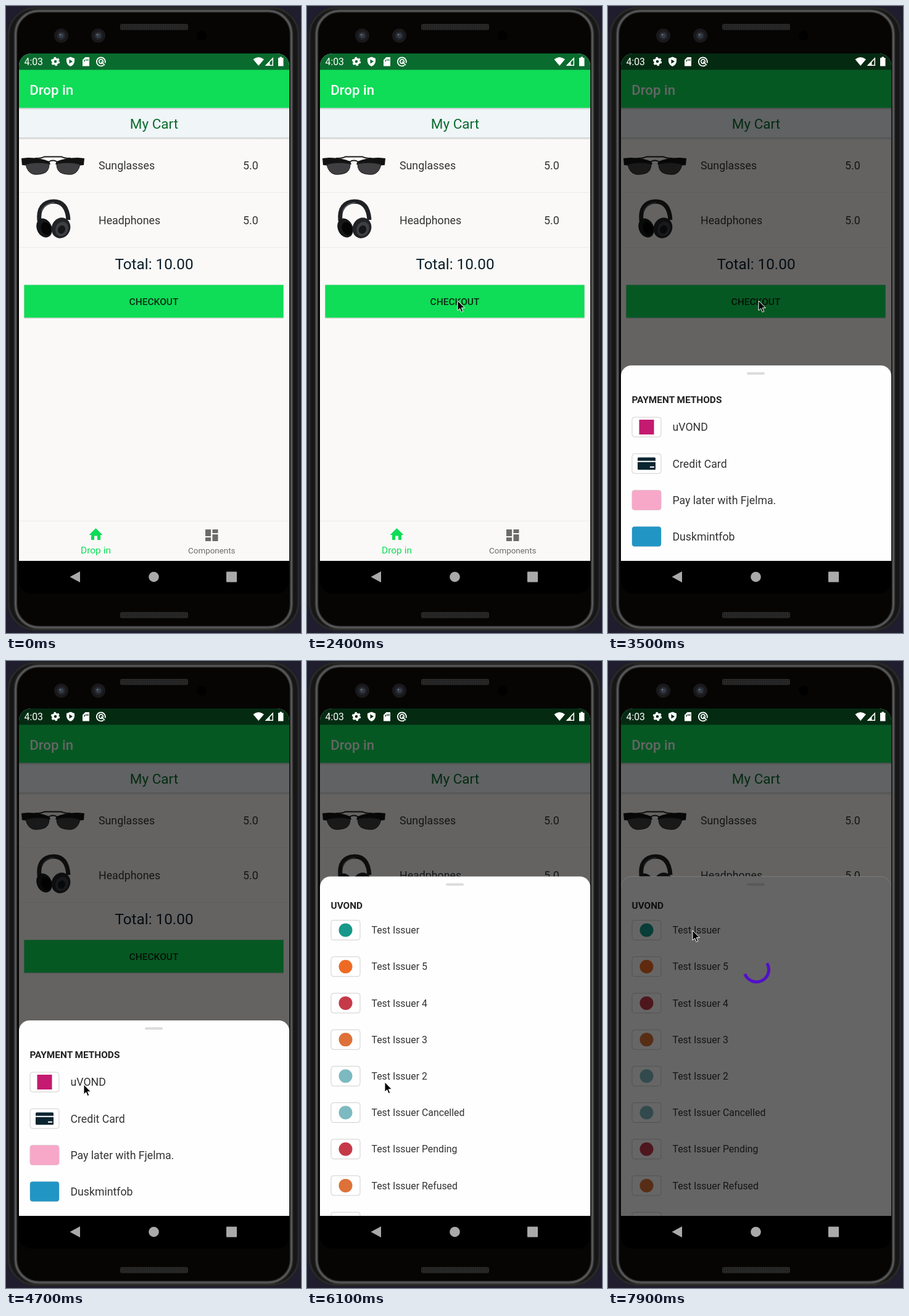
Write an HTML page that moves like this. It is 478 px wide and 1017 px high and loops after 8 s.

```html
<!DOCTYPE html>
<html lang="en">
<head>
<meta charset="utf-8">
<title>Drop in checkout</title>
<style>
  html, body { margin: 0; width: 100%; height: 100%; overflow: hidden; background: #1f1d2e; }
  svg { display: block; width: 100%; height: 100%; }
  text { font-family: Roboto, "Noto Sans", sans-serif; fill: #333; }
  .mid { text-anchor: middle; }
  .med { font-weight: 500; }
  .item { font-size: 17.8px; }
  .head { font-size: 15.4px; font-weight: 700; fill: #222; }
</style>
</head>
<body>
<svg viewBox="0 0 478 1017">
  <defs>
    <clipPath id="screen"><rect x="21" y="77" width="438" height="876" rx="20"/></clipPath>
    <clipPath id="window"><rect x="21" y="77" width="438" height="823"/></clipPath>
    <filter id="soft"><feGaussianBlur stdDeviation="0.8"/></filter>
    <linearGradient id="shade" x2="0" y2="1">
      <stop stop-opacity=".2"/><stop offset="1" stop-opacity="0"/>
    </linearGradient>
    <pattern id="mesh" width="3" height="3" patternUnits="userSpaceOnUse">
      <rect width="3" height="3" fill="#2c2c2c"/><circle cx="1.5" cy="1.5" r=".9" fill="#141414"/>
    </pattern>
    <g id="lens">
      <circle r="11.5" fill="#19191c"/><circle r="7" fill="#24262b"/>
      <circle r="4" fill="#343c48"/><circle cx="-1.5" cy="-1.5" r="1.3" fill="#66717f"/>
    </g>
    <g id="glass">
      <path d="M25 247L36 246Q56 246 70 252L72 257 36 259 26 258Z" fill="#121212"/>
      <path d="M32 257Q50 252 70 256 70 266 64 270 56 274 45 273 35 271 32 257Z" fill="#3f3e40" stroke="#1c1c1c"/>
      <path d="M69 253Q72 250.500 76 250.500M47 247Q58 247 62 244.500H76" fill="none" stroke="#1c1c1c" stroke-width="2"/>
    </g>
  </defs>

  <!-- Phone body -->
  <rect x="2" y="1" width="474" height="1013" rx="46" fill="#161616"/>
  <rect x="18" y="10" width="442" height="996" rx="36" fill="#060504"/>
  <g fill="none" filter="url(#soft)">
    <rect x="4" y="3" width="470" height="1009" rx="44" stroke="#383838" stroke-width="2"/>
    <rect x="15.5" y="8" width="447" height="1000" rx="37" stroke="#6a6a6a" stroke-width="3"/>
  </g>
  <use href="#lens" x="89.5" y="48"/>
  <use href="#lens" x="149.5" y="48"/>
  <circle cx="317" cy="48" r="8" fill="#000"/>
  <rect x="185" y="29" width="110" height="10" rx="3" fill="url(#mesh)"/>
  <rect x="185" y="983" width="110" height="10" rx="3" fill="url(#mesh)"/>

  <g clip-path="url(#screen)">
    <rect x="21" y="77" width="438" height="823" fill="#faf9f7"/>
    <rect x="21" y="77" width="438" height="27" fill="#0a6b2e"/>
    <rect x="21" y="103.5" width="438" height="62" fill="#0fdc57"/>
    <text class="med" x="38.3" y="143.5" font-size="22.3" style="fill:#fff">Drop in</text>
    <rect x="21" y="165.5" width="438" height="48.5" fill="#f0f5f8"/>
    <rect x="21" y="165.5" width="438" height="3" fill="url(#shade)"/>
    <rect x="21" y="213.5" width="438" height="3.5" fill="url(#shade)"/>
    <text class="mid" x="240" y="199" font-size="22.5" style="fill:#0a6b2e">My Cart</text>

    <!-- Sunglasses -->
    <use href="#glass"/>
    <use href="#glass" transform="translate(152) scale(-1 1)"/>
    <!-- Headphones -->
    <path d="M54 349Q51 318 77 317 99 317 101 347" fill="none" stroke="#202124" stroke-width="7"/>
    <path d="M58 333Q62 321 78 319" fill="none" stroke="#55575a" stroke-width="2"/>
    <ellipse cx="62" cy="360" rx="12" ry="16" transform="rotate(-24 62 360)" fill="#17181a"/>
    <ellipse cx="65" cy="361" rx="8" ry="11" transform="rotate(-24 65 361)" fill="#050505"/>
    <g transform="rotate(24 89 360)">
      <ellipse cx="89" cy="360" rx="15" ry="17" fill="#222326"/>
      <ellipse cx="91" cy="361" rx="10" ry="12" fill="#3d3f43"/>
      <ellipse cx="91" cy="362" rx="6" ry="7" fill="#151618"/>
    </g>

    <text class="item" x="150" y="265">Sunglasses</text>
    <text class="item" x="384" y="265">5.0</text>
    <text class="item" x="150" y="354">Headphones</text>
    <text class="item" x="384" y="354">5.0</text>
    <path d="M21 302.5H459M21 391.5H459M21 835.5H459" stroke="#ecebea"/>
    <text class="mid" x="240" y="427" font-size="24.3" style="fill:#0b1f2a">Total: 10.00</text>
    <rect x="29" y="452" width="421" height="55" rx="1" fill="#000" opacity=".13"/>
    <rect x="29.5" y="452.5" width="420" height="53" fill="#0fdc57"/>
    <text class="mid med" x="239.5" y="485" font-size="15.5" style="fill:#0b2a15">CHECKOUT</text>

    <path d="M134.500 858L145.500 847 156.500 858H153V866H148V859.500H143V866H138V858Z" fill="#0fdc57"/>
    <text class="mid" x="145.5" y="888" font-size="15.5" style="fill:#0fdc57">Drop in</text>
    <path d="M323 849h9v11h-9zM323 862h9v6h-9zM334.500 849h9v6h-9zM334.500 857h9v11h-9z" fill="#6b6b6b"/>
    <text class="mid" x="333.3" y="888" font-size="13.4" style="fill:#6b6b6b">Components</text>

    <rect x="21" y="900" width="438" height="53"/>
    <rect id="dim" x="21" y="77" width="438" height="823"/>
    <g id="methods"></g>
    <g id="issuers"></g>

    <!-- System icons -->
    <g fill="#fff">
      <text x="29.5" y="96" font-size="15.8" style="fill:#fff">4:03</text>
      <circle cx="80" cy="90" r="4" fill="none" stroke="#fff" stroke-width="3.5"/>
      <circle cx="80" cy="90" r="6.2" fill="none" stroke="#fff" stroke-width="2" stroke-dasharray="3.25"/>
      <path fill-rule="evenodd" d="M104.500 82.500L111 85V90Q110.500 95 104.500 98 98.500 95 98 90V85ZM102.500 86.500V93.500L108 90Z"/>
      <path fill-rule="evenodd" d="M128.500 83H135V97.500H124V87.500ZM126.500 87.500V90H128V87.500ZM129.300 86V89H130.600V86ZM132 86V89H133.300V86Z"/>
      <g fill="none" stroke="#fff" stroke-width="1.7">
        <path d="M158 96A7 7 0 1 1 160.500 92.500"/><circle cx="154" cy="90" r="3.3"/><path d="M154 90L160 96"/>
      </g>
      <path d="M400.500 86.500Q409 79.500 418 86.500L409.200 97Z"/>
      <path fill-rule="evenodd" d="M433 83V97H419.500ZM431.500 87L427.500 91V95.500H431.500Z"/>
      <path d="M441 84H443.500V82.500H447V84H449.500V97.500H441Z"/>
    </g>
    <g fill="#aaa">
      <path d="M103.500 926L120 917V935Z"/><circle cx="239.5" cy="926" r="8.3"/>
      <rect x="357" y="917.5" width="17" height="17" rx="1"/>
    </g>
  </g>
  <path id="cursor" d="M0 0V16L3.700 12.600 6.200 18.500 8.800 17.400 6.300 11.700H11.400Z" stroke="#fff"/>
</svg>
<script>
const $ = id => document.getElementById(id);
const ROW = 59.2;

const dot = color => y => `<circle cx="62.5" cy="${y}" r="11" fill="${color}"/>`;
const square = color => y => `<rect x="50.5" y="${y - 12}" width="24" height="24" fill="${color}"/>`;
const tile = color => y => `<rect x="39" y="${y - 16}" width="47" height="32" rx="4" fill="${color}"/>`;
const card = y => `<rect x="48" y="${y - 10}" width="29" height="20" rx="1.5" fill="#0b2530"/>
  <path d="M48 ${y - 3.5}H77M68 ${y + 5.5}H75" stroke="#fff" stroke-width="2"/>`;

// A bottom sheet: grip, heading and rows of [label, icon]
function sheet(top, headY, title, firstY, size, rows) {
  const body = rows.map(([label, icon], i) => {
    const y = firstY + i * ROW;
    return `<rect x="39" y="${y - 16}" width="47" height="32" rx="4" fill="#fff" stroke="#cfcfcf"/>
      ${icon(y)}<text x="104.5" y="${y + size * 0.36}" font-size="${size}">${label}</text>`;
  }).join("");
  return `<g clip-path="url(#window)">
    <rect x="21" y="${top}" width="438" height="600" rx="17" fill="#fefefe"/>
    <rect x="225" y="${top + 11}" width="29" height="4" rx="2" fill="#dcdcdc"/>
    <text class="head" x="38.5" y="${headY}">${title}</text>${body}</g>`;
}

$("methods").innerHTML = sheet(583, 644, "PAYMENT METHODS", 683, 17.7, [
  ["uVOND", square("#c41a70")],
  ["Credit Card", card],
  ["Pay later with Fjelma.", tile("#f7a8c9")],
  ["Duskmintfob", tile("#2196c5")]
]);

const green = dot("#17988a"), orange = dot("#ee6a24"), red = dot("#c53a48"),
      amber = dot("#dd7138"), teal = dot("#7db9c0");
$("issuers").innerHTML = sheet(349.5, 402, "UVOND", 436.5, 15.85, [
  ["Test Issuer", green], ["Test Issuer 5", orange], ["Test Issuer 4", red],
  ["Test Issuer 3", amber], ["Test Issuer 2", teal], ["Test Issuer Cancelled", teal],
  ["Test Issuer Pending", red], ["Test Issuer Refused", amber], ["", () => ""]
]) + `<g clip-path="url(#window)"><rect id="veil" x="21" y="349.5" width="438" height="600" rx="17"/></g>
  <path id="spinner" fill="none" stroke="#5210c8" stroke-width="5"/>`;

const ramp = (t, start, length) => Math.min(1, Math.max(0, (t - start) / length));
const slow = u => 1 - (1 - u) ** 2;
const smooth = u => u * u * (3 - 2 * u);

// Pointer strokes: start, duration, end x, end y, sideways bend
const ENTRY = [128, 503];
const strokes = [
  [500, 100, 201, 531, 0], [700, 400, 346, 853, .2],
  [1200, 500, 226, 500, -.42], [1700, 100, 244, 478, 0],
  [4000, 300, 434, 560, -.1], [4300, 300, 120, 680, .1], [4600, 100, 126, 687, 0],
  [5100, 100, 126, 683, 0], [6400, 300, 136, 408, 0], [6900, 100, 137, 437, 0]
];

function pointer(t) {
  let [x, y] = ENTRY;
  for (const [start, length, endX, endY, bend] of strokes) {
    const u = smooth(ramp(t, start, length));
    const dx = endX - x, dy = endY - y, side = 4 * u * (1 - u) * bend;
    x += dx * u + dy * side;
    y += dy * u - dx * side;
    if (u < 1) break;
  }
  return [x, y];
}

const opacity = (id, value) => $(id).setAttribute("opacity", value);
const move = (id, x, y) => $(id).setAttribute("transform", `translate(${x} ${y})`);

// Sheets rise by a fifth of the screen while fading in
function showSheet(id, shown) {
  opacity(id, shown);
  move(id, 0, 175 * (1 - shown));
}

function arc(start, sweep) {
  const point = deg => {
    const a = deg * Math.PI / 180;
    return `${240.5 + 20 * Math.cos(a)} ${500.5 + 20 * Math.sin(a)}`;
  };
  return `M${point(start)}A20 20 0 ${+(sweep > 180)} 1 ${point(start + sweep)}`;
}

function draw(now) {
  const t = Math.floor(now % 8000 / 100) * 100;
  const leaving = t < 5400 ? 1 : t < 5600 ? .965 : 0;
  showSheet("methods", slow(ramp(t, 3289, 150)) * leaving);
  showSheet("issuers", slow(ramp(t, 5928, 150)));
  opacity("dim", .6 * ramp(t, 3265, 150));
  opacity("veil", .6 * ramp(t, 7450, 250));

  const turn = Math.floor((t - 7700) / 200);
  $("spinner").setAttribute("d", turn < 0 ? "" : arc(59 * turn - 90, 70 + 120 * turn));

  opacity("cursor", +(t >= 500));
  move("cursor", ...pointer(t));
}

const begin = performance.now();
function tick() {
  draw(performance.now() - begin);
  requestAnimationFrame(tick);
}
tick();
</script>
</body>
</html>
```
